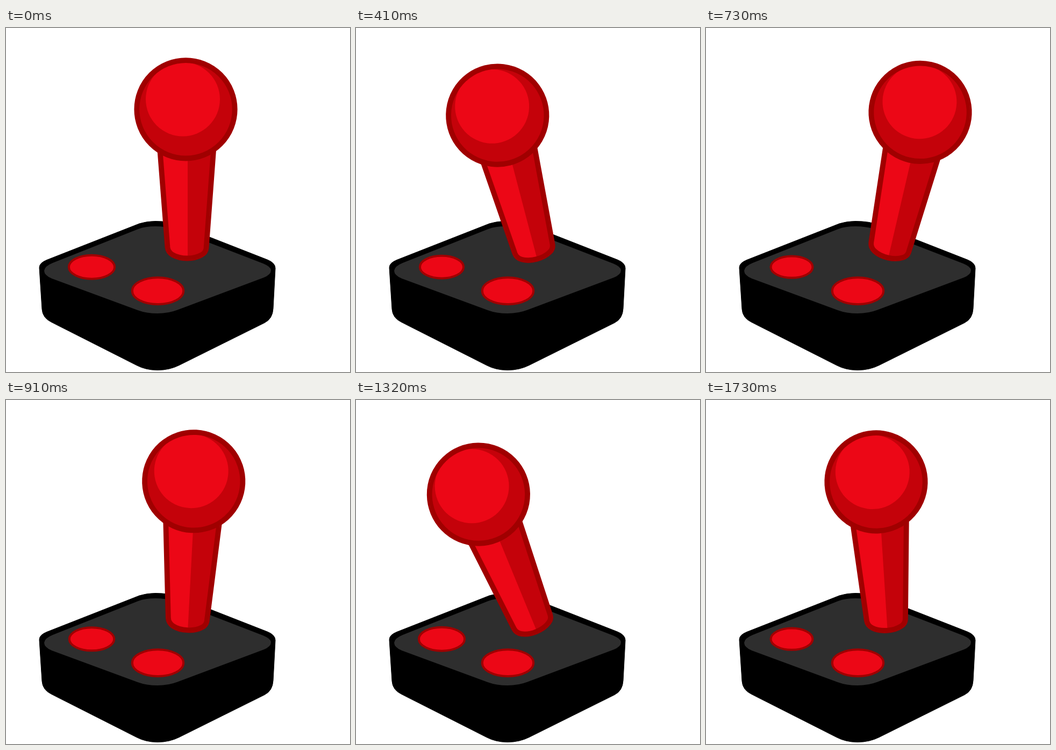
Write an HTML page with a canvas that moves like this. It is 640 by 640 pixels and loops after 1.78 s.

```html
<!DOCTYPE html>
<html lang="en">
<head>
<meta charset="utf-8">
<title>Joystick</title>
<style>
  html, body { margin: 0; width: 100%; height: 100%; overflow: hidden; background: #fff; }
  canvas { display: block; width: 100vmin; height: 100vmin; }
</style>
</head>
<body>
<canvas id="stage" width="640" height="640"></canvas>
<script>
const ctx = document.getElementById('stage').getContext('2d');
const LOOP = 1780, FPS = 22, LAST = 38;
const RED = '#ec0716', SHADE = '#c4020a', EDGE = '#a00000', TOP = '#2e2e2e';
const PIVOT = [342.5, 433];

// [ms, value] keys, joined by straight lines
const TILT = [[0, 0], [364, -18.7], [737, 13.7], [1335, -23.3], [1804, 0]];
const PRESS = [[300, 1], [500, 0.915], [780, 0.915], [950, 1], [1320, 1], [1510, 0.915], [1780, 0.915]];

function valueAt(keys, t) {
  if (t <= keys[0][0]) return keys[0][1];
  for (let i = 1; i < keys.length; i++) {
    const [t0, a] = keys[i - 1], [t1, b] = keys[i];
    if (t <= t1) return a + (b - a) * (t - t0) / (t1 - t0);
  }
  return keys[keys.length - 1][1];
}

// Start of step k, on a 10 ms clock
const stepStart = k => Math.round(k * 100 / FPS) * 10;

function stepTime(t) {
  let k = LAST;
  while (k > 0 && stepStart(k) > t) k--;
  return stepStart(k);
}

function ellipse(x, y, rx, ry, fill, stroke, width) {
  ctx.beginPath();
  ctx.ellipse(x, y, rx, ry, 0, 0, Math.PI * 2);
  if (fill) {
    ctx.fillStyle = fill;
    ctx.fill();
  }
  if (stroke) {
    ctx.strokeStyle = stroke;
    ctx.lineWidth = width;
    ctx.stroke();
  }
}

const BODY = new Path2D(
  'M62 446 Q62 437 76 431.500 L248 364 Q262 359.500 278 359.500 Q304 359.500 320 366 ' +
  'L486 431 Q501 437 501 447 L497 522 Q496 541 481 548.500 L322 627.500 ' +
  'Q304 636.500 282 636.500 Q260 636.500 243 627.500 L84 547 Q68 539 67 523 Z');

const FACE = new Path2D(
  'M71 451.500 Q72 443 87 437 L246 374 Q259 369 278 369 Q297 369 311 373.500 ' +
  'L478 438 Q493 444 493 451 Q493 459 479 464.500 L319 524.500 ' +
  'Q302 531 282 531 Q261 531 245 525 L85 466 Q71 460 71 451.500 Z');

const SHAFT = new Path2D(
  'M286 222 L300.500 408 Q301.500 417 310 422 Q321 428.500 337 428.500 ' +
  'Q353 428.500 364 422 Q371.500 418 372.500 410 L386.500 222 Z');

function drawBase(press) {
  ctx.fillStyle = ctx.strokeStyle = '#000';
  ctx.lineWidth = 1;
  ctx.fill(BODY);
  ctx.stroke(BODY);
  ctx.fillStyle = TOP;
  ctx.fill(FACE);
  ellipse(159.5, 444.7, 42.6 * press, 22 * press, RED, EDGE, 4);
  ellipse(282.5, 489.2, 47.7, 24.9, RED, EDGE, 4);
}

function drawStick(angle) {
  ctx.save();
  ctx.translate(...PIVOT);
  ctx.rotate(angle * Math.PI / 180);
  ctx.translate(-PIVOT[0], -PIVOT[1]);

  ctx.fillStyle = RED;
  ctx.fill(SHAFT);
  ctx.save();
  ctx.clip(SHAFT);
  ctx.fillStyle = SHADE;
  ctx.fillRect(338, 200, 70, 240);
  ctx.restore();
  ctx.strokeStyle = EDGE;
  ctx.lineWidth = 9.8;
  ctx.stroke(SHAFT);

  ellipse(334.5, 151.3, 91, 91, SHADE);
  ellipse(329, 132.5, 69, 69, RED);
  ellipse(334.5, 151.3, 91.2, 91.2, null, EDGE, 9.8);
  ctx.restore();
}

function draw(now) {
  const t = stepTime(now % LOOP);
  ctx.fillStyle = '#fff';
  ctx.fillRect(0, 0, 640, 640);
  drawBase(valueAt(PRESS, t));
  drawStick(valueAt(TILT, t));
}

let start = null;
function tick(now) {
  if (start === null) start = now;
  draw(now - start);
  requestAnimationFrame(tick);
}
draw(0);
requestAnimationFrame(tick);
</script>
</body>
</html>
```
